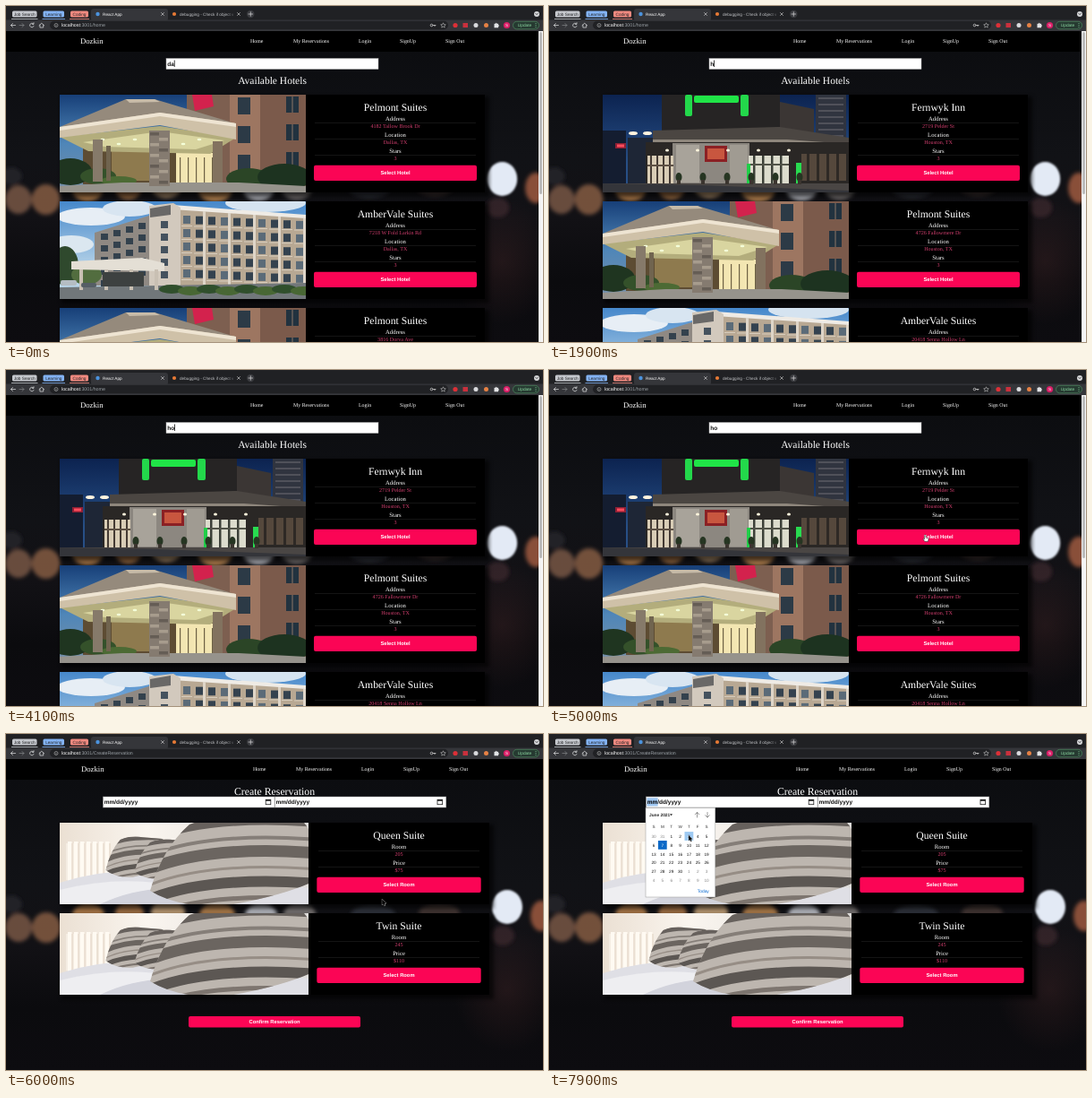
An HTML page for the animation above (8000 ms loop, 600 px wide and 375 px high).

```html
<!DOCTYPE html>
<html lang="en">
<head>
<meta charset="utf-8">
<title>Hotel booking</title>
<style>
html, body { margin: 0; width: 100%; height: 100%; overflow: hidden; background: #000; }
svg { display: block; width: 600px; height: 375px; }
text { font-family: "Liberation Serif", serif; fill: #fff; text-rendering: geometricPrecision; white-space: pre; }
.c { text-anchor: middle; }
.s, .b { font-family: "Liberation Sans", sans-serif; }
.b { font-weight: bold; }
.pink { fill: #d23f6f; }
</style>
</head>
<body>
<svg id="stage" viewBox="0 0 600 375" xmlns="http://www.w3.org/2000/svg"></svg>
<script>
const LOOP = 8000, STEP = 100;

// Markup helpers
const rect = (x, y, w, h, fill, more = '') => `<rect x="${x}" y="${y}" width="${w}" height="${h}" fill="${fill}" ${more}/>`;
const oval = (x, y, rx, ry, fill, more = '') => `<ellipse cx="${x}" cy="${y}" rx="${rx}" ry="${ry}" fill="${fill}" ${more}/>`;
const path = (d, fill, more = '') => `<path d="${d}" fill="${fill}" ${more}/>`;
const line = (d, color, w = .7) => path(d, 'none', `stroke="${color}" stroke-width="${w}" stroke-linecap="round" stroke-linejoin="round"`);
const text = (x, y, size, str, cls = '', more = '') => `<text x="${x}" y="${y}" font-size="${size}" class="${cls}" ${more}>${str}</text>`;
const group = (id, body, more = '') => `<g id="${id}" ${more}>${body}</g>`;
const fade = (id, stops, flat) => `<linearGradient id="${id}" x2="${flat ? 1 : 0}" y2="${flat ? 0 : 1}">` +
  stops.map(([o, c]) => `<stop offset="${o}" stop-color="${c}"/>`).join('') + '</linearGradient>';
const times = (n, fn) => Array.from({ length: n }, (_, i) => fn(i)).join('');

// Photos, drawn in a 275 x 109 box
const porch = () =>
  rect(0, 0, 275, 109, 'url(#dusk)') +
  rect(142, 0, 133, 109, '#7d5f50') + rect(190, 0, 34, 109, '#9d7661') + rect(224, 0, 51, 109, '#7b5a4b') +
  times(3, i => rect(199, 3 + i * 32, 14, 19, '#2c3a46') + rect(253, 2 + i * 31, 14, 18, '#22323f') + rect(259.5, 2 + i * 31, 1, 18, '#8b7768')) +
  rect(26, 54, 155, 46, '#5d4c33') + rect(58, 62, 42, 34, '#8e7a4e') +
  rect(130, 65, 42, 33, '#f3e6b2') + times(5, i => rect(134 + i * 9, 70, 1.2, 28, '#6d6144')) +
  path('M0 47L112 35L197 48L168 66L32 63z', '#b3ad7c') + path('M26 53L112 41L184 51L152 61L50 58z', '#d9d5a0') +
  times(7, i => oval(48 + i * 18, 50 + i % 2 * 5, 2.4, 1.2, '#f4ffd8')) +
  path('M0 36L74 5H106L196 32L112 21z', '#958a7c') + path('M74 5H106L112 8L78 9z', '#c7bba8') +
  path('M0 36L112 20L197 32V50L112 34L0 48z', '#cfc1a8') + path('M0 36L112 20L197 32V36L112 24L0 40z', '#eee4d2') +
  oval(12, 86, 24, 15, '#1f3520') + oval(43, 91, 20, 9, '#34512a') + oval(66, 96, 20, 5, '#4c6a34') +
  oval(211, 94, 25, 12, '#2b4526') + oval(251, 92, 30, 15, '#1d3320') +
  path('M0 102L70 98H200L275 102V109H0z', '#96938c') +
  rect(100, 40, 23, 62, '#857b70') +
  times(10, i => rect(101 + i % 2 * 10, 42 + i * 6, 10, 3.5, i % 3 ? '#a79c8d' : '#655d55')) +
  rect(37, 50, 11, 47, '#867a6a') + rect(52, 57, 5, 39, '#70644f') + rect(171, 52, 11, 46, '#82725f') +
  path('M148 0H170L172 13L151 18z', '#d3224d');

const tower = () =>
  rect(0, 0, 275, 109, 'url(#day)') +
  oval(35, 17, 38, 10, '#e7eef5') + oval(78, 8, 30, 9, '#d8e5f1') + oval(230, 2, 45, 10, '#d5e3f0') + oval(13, 48, 25, 10, '#dbe7f0') +
  path('M39 35L106 14V94H39z', '#8f8983') + path('M128 5L275 17V96H128z', '#b8a893') +
  path('M126 4L275 15V19L126 9z', '#efebe5') +
  times(5, j => times(10, i => rect(138 + i * 14, 16 + j * 15 + i * .65, 8, 9, i % 3 ? '#34424f' : '#5b6b78') +
    rect(136 + i * 14, 27 + j * 15 + i * .5, 12, 1, '#d8cdbd')) +
    times(4, i => rect(46 + i * 14, 36 - i * 4 + j * 13, 8, 7, '#33414d'))) +
  times(6, i => rect(132 + i * 28, 9 + i * 2, 3, 86, '#ded5c8')) +
  path('M100 5L127 2L135 7V95H100z', '#d2c9bd') + path('M101 8L124 4V15L101 18z', '#696867') +
  times(5, j => rect(113, 22 + j * 14, 8, 8, '#45525e')) +
  oval(6, 72, 15, 22, '#2f492d') + oval(30, 82, 17, 11, '#526d3f') +
  path('M0 96L275 91V109H0z', '#71777a') +
  path('M13 67L92 63L117 69V78L13 76z', '#e4dfd5') +
  times(4, i => rect(22 + i * 28, 76, 4, 23, '#c9c0b3')) + rect(48, 79, 46, 16, '#3d4140') +
  times(8, i => oval(125 + i * 21, 98 + i % 2 * 2, 14, 5, i % 2 ? '#486734' : '#304f2c')) +
  rect(1, 88, 18, 6, '#b5bdc3', 'rx="2"') + rect(24, 91, 17, 5, '#555e65', 'rx="2"');

const night = () =>
  rect(0, 0, 275, 109, 'url(#blue)') +
  rect(0, 40, 26, 62, '#141d30') + rect(28, 48, 34, 54, '#1e2636') +
  rect(238, 0, 34, 70, '#30343f') + times(8, i => rect(241, 3 + i * 7, 28, 2, '#50515a')) +
  path('M66 0H198V42H66z', '#262424') + path('M198 8L236 16V48H198z', '#3b3634') +
  path('M56 40L198 36L275 48V56H56z', '#4b4642') + path('M56 50H206L275 55V60H56z', '#8e867c') +
  rect(48, 53, 227, 50, '#2a2725') + rect(78, 54, 86, 47, '#8c8780') + rect(82, 56, 26, 42, '#a8a39a') + rect(142, 56, 20, 42, '#a09b92') +
  rect(50, 68, 29, 31, '#d9cdb6') + rect(163, 68, 45, 31, '#dcdccd') + rect(222, 66, 50, 30, '#55483c') +
  times(4, i => rect(53 + i * 7, 68, 2, 31, '#443a33') + rect(168 + i * 10, 68, 2.5, 31, '#3c4038') + rect(228 + i * 11, 66, 3, 30, '#2e2925')) +
  rect(50, 78, 29, 2, '#5d5044') + rect(163, 77, 45, 2, '#515348') +
  rect(114, 57, 25, 18, '#8b2024') + rect(117, 60, 19, 12, '#c8563f') +
  rect(102, 1, 50, 8, '#20e447', 'rx="2"') + rect(92, 0, 8, 24, '#23d84b', 'rx="2"') + rect(154, 0, 9, 24, '#23d84b', 'rx="2"') +
  rect(161, 77, 4, 22, '#20ce48') + rect(216, 76, 6, 23, '#28db50') +
  oval(34, 43, 5, 2, '#fff4df') + oval(50, 43, 5, 2, '#fff4df') +
  rect(14, 54, 12, 6, '#8d2035') + rect(16, 55.5, 8, 3, '#ff4c5d') +
  rect(0, 99, 275, 10, '#4a4644') + path('M0 99L110 101L275 107V109H0z', '#34353a') +
  times(6, i => oval(85 + i * 27, 92, 3.5, 5, '#263522') + rect(83 + i * 27, 95, 4, 5, '#3b352f')) +
  times(5, i => oval(72 + i * 34, 62, 2, 1.6, '#fff6dd'));

const pillow = () => path('M101 76Q115 28 145 2Q174 -9 213 -4L273 0Q289 18 280 67Q247 82 183 93Q132 95 101 76z', '#bdb6af') +
  '<g clip-path="url(#cushion)">' +
  [[8, 10, '#67615d'], [27, 4, '#857e78'], [42, 13, '#6b6560'], [60, 3, '#968d85'], [76, 12, '#5c5753'], [94, 5, '#7d756f']]
    .map(([y, w, c]) => path(`M92 ${y + 13}Q160 ${y - 18} 290 ${y - 8}`, 'none', `stroke="${c}" stroke-width="${w}"`)).join('') + '</g>';

const bed = () =>
  rect(0, 0, 278, 91, 'url(#wall)') + rect(7, 23, 49, 41, '#f5ede3') +
  times(7, i => rect(9 + i * 7, 21, 4.5, 44, '#fffaf2') + rect(13.5 + i * 7, 23, 1, 41, '#dfd1c2')) +
  path('M0 67Q62 47 132 58L278 73V91H0z', '#dfdfe5') + path('M0 75Q70 57 141 72L165 91H0z', '#eeeef1') +
  path('M45 91Q102 65 151 79L168 91z', '#d2d3dc') +
  '<use href="#pillow" transform="translate(14 18) scale(.37 .46)"/><use href="#pillow" transform="translate(43 21) scale(.4 .45)"/><use href="#pillow"/>';

// Page parts
const button = (x, y, w, h, label) => rect(x, y, w, h, '#fb0555', 'rx="2"') + text(x + w / 2, y + h / 2 + 2, 5.8, label, 'b c');
const facts = (x, y, rows) => rows.map(([label, value], i) =>
  text(x, y + i * 18, 6.7, label, 'c') + rect(x - 90, y + 2 + i * 18, 180, .5, '#292929') +
  text(x, y + 8 + i * 18, 6.1, value, 'c pink')).join('');
const shadow = (y, w, h) => rect(62, y + 2, w + 3, h + 3, '#000', 'opacity=".6" filter="url(#soft)"');

const hotel = (y, photo, name, street, city) => shadow(y, 475, 109) +
  rect(335, y, 200, 109, '#000') + `<svg x="60" y="${y}" width="275" height="109"><use href="#${photo}"/></svg>` +
  text(435, y + 18, 11.7, name, 'c') + facts(435, y + 29, [['Address', street], ['Location', city], ['Stars', 3]]) +
  button(344, y + 78.7, 182, 17.3, 'Select Hotel');

const room = (y, name, number, price) => shadow(y, 480, 91) +
  rect(338, y, 202, 91, '#000') + `<svg x="60" y="${y}" width="278" height="91"><use href="#bed"/></svg>` +
  text(439, y + 18, 11.7, name, 'c') + facts(439, y + 29, [['Room', number], ['Price', price]]) +
  button(347.3, y + 60.7, 183.4, 17.3, 'Select Room');

const nav = (brandX, xs) => rect(0, 28, 600, 23, '#000') + text(brandX, 42, 8.7, 'Dozkin') +
  ['Home', 'My Reservations', 'Login', 'SignUp', 'Sign Out'].map((s, i) => text(xs[i], 41.2, 5.9, s)).join('');

const dateField = x => rect(x, 70, 191.5, 12, '#fff', 'stroke="#999" stroke-width=".5"') +
  text(x + 1.2, 78.2, 6.5, 'mm/dd/yyyy', 'b', 'style="fill:#111"') +
  rect(x + 181.7, 73.3, 5.6, 5.4, 'none', 'stroke="#222" stroke-width=".8"') + rect(x + 181.7, 73, 5.6, 1.8, '#222');

const backdrop = rect(0, 28, 600, 347, 'url(#dark)') + '<g filter="url(#blur)">' +
  [[14, 216, 15, 16, '#7d5a48'], [45, 216, 16, 17, '#8d6146'], [6, 190, 12, 10, '#25242a'],
   [92, 203, 18, 15, '#c58a50'], [138, 201, 16, 15, '#b67d4a'], [181, 199, 19, 15, '#d8b184'], [236, 203, 20, 16, '#c98f54'],
   [285, 203, 18, 14, '#d5d8e0'], [328, 202, 18, 14, '#8a8583'], [410, 202, 25, 12, '#343941'], [484, 200, 23, 12, '#4c3b37'],
   [598, 203, 12, 17, '#a85f42'], [555, 225, 13, 11, '#37242a']]
    .map(a => oval(...a, 'opacity=".8"')).join('') +
  '</g>' + oval(560, 193, 17, 19, '#e3eaf5', 'filter="url(#edge)"') + oval(560, 285, 60, 70, 'url(#ember)');

const tabGroup = (x, w, label, color) => rect(x, 5.5, w, 7, color, 'rx="1.5"') + rect(x - 1, 14.2, w + 2, .8, color) +
  text(x + w / 2, 10.7, 4.7, label, 's c', 'style="fill:#202124"');

const chrome = rect(0, 0, 600, 28, '#202124') + rect(0, 15.5, 600, 12.5, '#35363a') + rect(95, 3, 86, 14, '#35363a', 'rx="3"') +
  tabGroup(7, 27.5, 'Job Search', '#c5c8cd') + tabGroup(41.5, 23.5, 'Learning', '#83b3f4') + tabGroup(72, 20, 'Coding', '#f18a80') +
  oval(102.5, 9, 2.2, 2.2, '#4b93dd') + text(108, 10.8, 4.7, 'React App', 's') +
  oval(188, 9, 2.1, 2.1, '#e77a35') + text(194, 10.8, 4.7, 'debugging - Check if object v', 's', 'style="fill:url(#trail)"') +
  [175, 260].map(x => line(`M${x - 1.5} 7.5l3 3m0-3l-3 3`, '#ddd', .6)).join('') +
  oval(273.3, 9, 4.2, 4.2, '#3a3b3f') + line('M271 9h4.6m-2.3-2.3v4.6', '#ddd') +
  oval(593, 9, 3, 3, '#d5d6d8') + line('M591.7 8.3l1.3 1.4 1.3-1.4', '#202124', .7) +
  line('M10.5 21.5h-5m2-2l-2 2 2 2', '#e1e2e4') + line('M15 21.5h5m-2-2l2 2-2 2', '#85878a') +
  line('M30.7 20a2.3 2.3 0 1 0 .4 2.3M31 18.6v1.7h-1.7', '#e1e2e4') + line('M37 21.7l2.8-2.5 2.8 2.5m-4.7-.6v2.9h3.8v-2.9', '#e1e2e4') +
  rect(49, 16.8, 445, 9.4, '#202124', 'rx="4.7"') + oval(56, 21.5, 2, 2, 'none', 'stroke="#bbb" stroke-width=".6"') + line('M56 21.3v1', '#bbb', .6) +
  text(62, 23.4, 5.3, 'localhost<tspan fill="#9aa0a6">:3001<tspan id="route"></tspan></tspan>', 's') +
  oval(475.5, 21.5, 1.3, 1.3, 'none', 'stroke="#ddd" stroke-width=".7"') + line('M477 21.5h3m-1 0v1', '#ddd') +
  path('M488.5 18.8l.8 1.8 2 .2-1.5 1.3.4 2-1.7-1-1.7 1 .4-2-1.5-1.3 2-.2z', 'none', 'stroke="#ddd" stroke-width=".5"') +
  oval(502, 21.5, 2.6, 2.6, '#dc3037') + rect(510.5, 19, 5.5, 5, '#c9303d') + oval(525, 21.5, 2.5, 2.5, '#d9dadd') +
  oval(536.5, 21.5, 2.5, 2.5, '#e68144') + path('M545.5 19.8h1.4q.8-2 1.6 0h1.6v1.4q1.9.7 0 1.6v1.4h-4.6z', '#e2e3e5') +
  oval(559.5, 21.5, 3.6, 3.6, '#db1e67') + text(559.5, 23.1, 4.5, 'S', 's c') +
  rect(566.5, 17.3, 29, 8.5, '#263a31', 'rx="4.2" stroke="#559a6b" stroke-width=".6"') + text(579.5, 23.2, 4.8, 'Update', 's c', 'style="fill:#8bd6a1"') +
  times(3, i => oval(592, 19.6 + i * 1.9, .5, .5, '#8bd6a1'));

// Date picker
const cellX = i => 117 + i % 7 * 9.85, cellY = i => 114 + Math.floor(i / 7) * 9.9;
const day = i => i < 2 ? 30 + i : i < 32 ? i - 1 : i - 31;
const picker = rect(108, 82.2, 77.8, 99.8, '#fff', 'stroke="#999" stroke-width=".5"') +
  text(112, 91.8, 4.8, 'June 2021', 'b', 'style="fill:#222"') + path('M135 89.2h3l-1.5 2z', '#222') +
  line('M165.5 93v-5.5m-2.3 2.3l2.3-2.3 2.3 2.3M177 87.5v5.5m-2.3-2.3l2.3 2.3 2.3-2.3', '#555', .6) +
  [...'SMTWTFS'].map((s, i) => text(cellX(i), 104.7, 4.6, s, 's c', 'style="fill:#333"')).join('') +
  rect(0, 0, 9.8, 9.8, '#9dc9f2', 'id="hover"') + rect(121.9, 119, 9.8, 9.8, '#0b69c7') +
  times(42, i => text(cellX(i).toFixed(1), (cellY(i) + 1.7).toFixed(1), 4.7, day(i), 's c',
    `style="fill:${i === 8 ? '#fff' : i < 2 || i > 31 ? '#888' : '#111'}"`)) +
  text(172.3, 176.5, 4.9, 'Today', 's c', 'style="fill:#0869d0"');

const filter = (id, d) => `<filter id="${id}" x="-20%" y="-20%" width="140%" height="140%"><feGaussianBlur stdDeviation="${d}"/></filter>`;

stage.innerHTML = '<defs>' +
  fade('dusk', [[0, '#173f78'], [.5, '#4f86b8'], [1, '#7890a8']]) + fade('day', [[0, '#4688cb'], [.7, '#b9d5e9']]) +
  fade('blue', [[0, '#0c2350'], [.7, '#274f86']]) + fade('wall', [[0, '#ebe0d3'], [.35, '#faf5ef'], [1, '#dedcda']], true) +
  fade('dark', [[0, '#0b0c0f'], [.4, '#111216'], [.6, '#121115'], [.8, '#0b0b0e'], [1, '#0d0c10']]) +
  fade('trail', [[.85, '#c0c2c5'], [1, '#4a4b4f']], true) +
  '<radialGradient id="ember"><stop stop-color="#4a292b" stop-opacity=".35"/><stop offset="1" stop-color="#4a292b" stop-opacity="0"/></radialGradient>' +
  '<clipPath id="cushion"><path d="M101 76Q115 28 145 2Q174 -9 213 -4L273 0Q289 18 280 67Q247 82 183 93Q132 95 101 76z"/></clipPath>' +
  filter('blur', 2) + filter('edge', 1) + filter('soft', 2) +
  group('porch', porch()) + group('tower', tower()) + group('night', night()) + group('pillow', pillow()) + group('bed', bed()) +
  '</defs>' +
  group('scene', backdrop) +
  group('home', nav(83, [273, 321, 394, 440, 491]) +
    rect(179, 58.5, 237, 12, '#fff', 'stroke="#aaa" stroke-width=".5"') +
    text(180.2, 67, 6.5, '', 'b', 'id="query" style="fill:#111"') + rect(0, 60.5, .8, 7.5, '#111', 'id="caret"') +
    text(297.5, 87, 11.5, 'Available Hotels', 'c') +
    group('dallas',
      hotel(99, 'porch', 'Pelmont Suites', '4182 Tallow Brook Dr', 'Dallas, TX') +
      hotel(218, 'tower', 'AmberVale Suites', '7218 W Fold Larkin Rd', 'Dallas, TX') +
      hotel(337, 'porch', 'Pelmont Suites', '3816 Dorva Ave', 'Dallas, TX')) +
    group('houston',
      hotel(99, 'night', 'Fernwyk Inn', '2719 Pelder St', 'Houston, TX') +
      hotel(218, 'porch', 'Pelmont Suites', '4726 Fallowmere Dr', 'Houston, TX') +
      hotel(337, 'tower', 'AmberVale Suites', '20418 Senna Hollow Ln', 'Houston, TX')) +
    rect(595, 28, 5, 347, '#f6f6f6') + rect(596, 29, 3, 181, '#bcbcbc', 'rx="1.5"')) +
  group('booking', nav(84, [276, 324, 397, 444, 495]) + text(300, 67.5, 11.8, 'Create Reservation', 'c') +
    dateField(108.5) + dateField(300.3) +
    room(99, 'Queen Suite', 205, '$75') + room(200, 'Twin Suite', 245, '$110') +
    button(204, 315, 192, 12.5, 'Confirm Reservation') +
    group('picker', rect(109.4, 71.3, 12.2, 9.2, '#7fb5ee', 'opacity=".75"') + text(109.7, 78.2, 6.5, 'mm', 'b', 'style="fill:#111"') + picker)) +
  chrome +
  group('cursor',
    path('M0 0v6.2l1.5-1.3 1 2.3 1-.4-1-2.3h2z', '#000', 'id="arrow" stroke="#fff" stroke-width=".6" paint-order="stroke"') +
    path('M-.7 0q.7-.9 1.4 0v2.6l2.6.6q.6.4.4 1.4l-.6 2.4h-3.4l-2-2.6q-.2-1 .8-.6l.8.6z', '#fff', 'id="hand" stroke="#111" stroke-width=".5"'));

// Timeline
const typing = [[0, 'da'], [100, 'dal'], [300, 'dall'], [1200, 'dal'], [1300, 'da'], [1400, 'd'], [1800, ''], [1900, 'h'], [2100, 'ho']];
const moves = [[4400, 300, 66], [4900, 420.3, 184.5], [6100, 420.3, 184.5], [6700, 292.5, 74.5], [6900, 292.5, 74.5],
  [7100, 310, 91], [7200, 292.5, 74.5], [7400, 292.5, 74.5], [7900, 156, 113]];
const LIST_AT = 1800, PAGE_AT = 6000, PICKER_AT = 7400;

const el = id => document.getElementById(id);
const show = (id, on) => { el(id).style.display = on ? '' : 'none'; };

function pointer(t) {
  const i = moves.findIndex(m => m[0] > t);
  if (i < 0) return moves[moves.length - 1].slice(1);
  const [t0, x0, y0] = moves[Math.max(0, i - 1)], [t1, x1, y1] = moves[i];
  const k = t > t0 ? (t - t0) / (t1 - t0) : 0, e = k * k * (3 - 2 * k);
  return [x0 + (x1 - x0) * e, y0 + (y1 - y0) * e];
}

function render(t) {
  const home = t < PAGE_AT;
  show('home', home);
  show('booking', !home);
  show('dallas', t < LIST_AT);
  show('houston', t >= LIST_AT);
  show('picker', t >= PICKER_AT);
  el('route').textContent = home ? '/home' : '/CreateReservation';
  el('scene').setAttribute('transform', home ? 'scale(.99 1)' : '');

  if (home) {
    const [since, value] = typing.filter(k => k[0] <= t).pop();
    el('query').textContent = value;
    el('caret').setAttribute('x', 180.2 + (value ? el('query').getComputedTextLength() : 0));
    show('caret', (t - since) % 1000 < 500);
  }

  const [x, y] = pointer(t);
  const onButton = home ? x > 344 && y > 178 && y < 195 : x > 347 && y > 160 && y < 177;
  show('cursor', t >= moves[0][0]);
  show('hand', onButton);
  show('arrow', !onButton);
  el('cursor').setAttribute('transform', `translate(${x} ${y})`);

  const col = Math.round((x - 117) / 9.85), row = Math.round((y - 114) / 9.9);
  show('hover', col >= 0 && col < 7 && row >= 0 && row < 6);
  el('hover').setAttribute('x', 112.1 + col * 9.85);
  el('hover').setAttribute('y', 109.1 + row * 9.9);
}

let start, last;
function tick(now) {
  start ??= now;
  const t = Math.floor((now - start) % LOOP / STEP) * STEP;
  if (t !== last) render(last = t);
  requestAnimationFrame(tick);
}
render(0);
requestAnimationFrame(tick);
</script>
</body>
</html>
```
